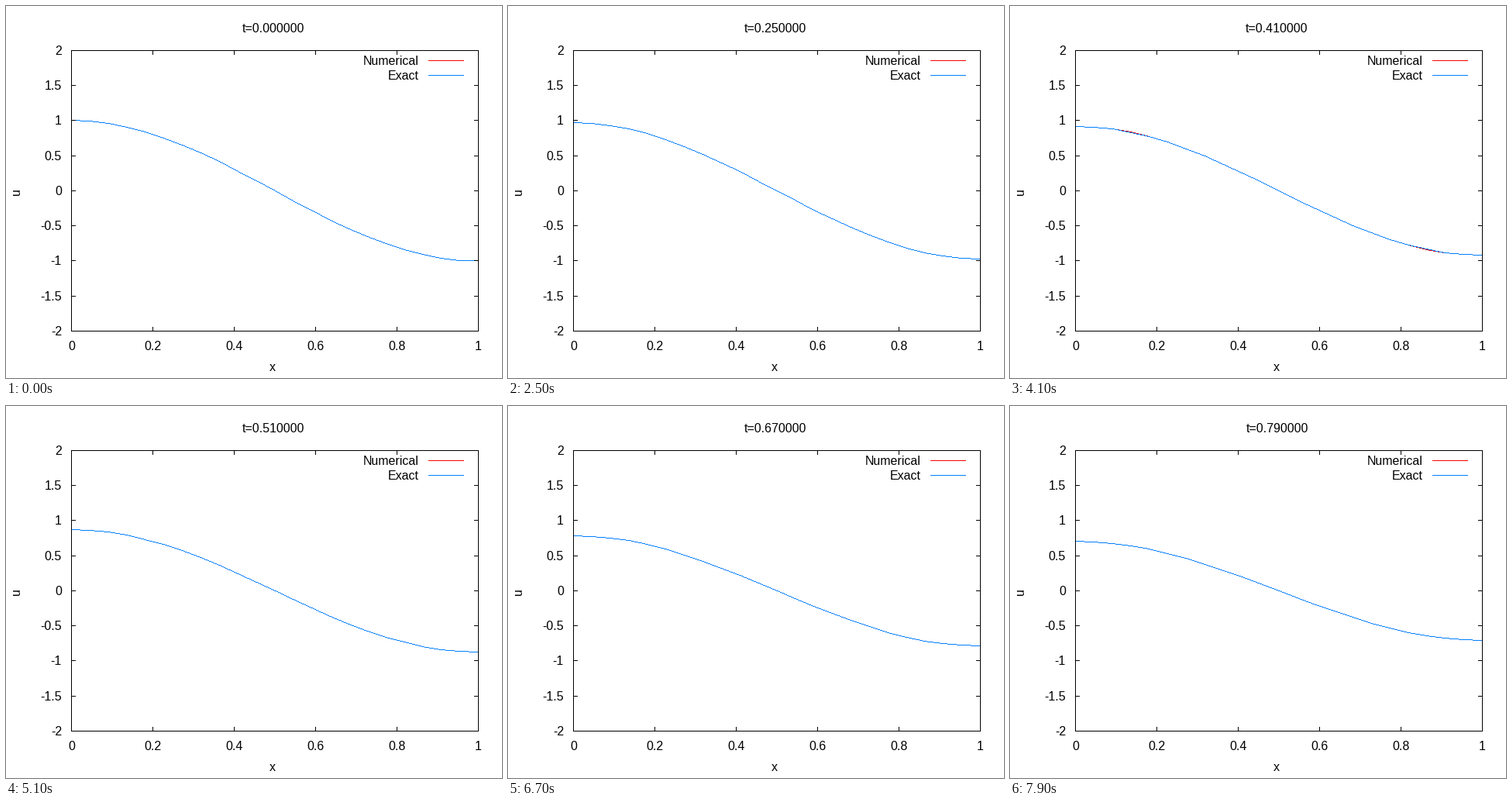
Write a matplotlib script that moves like this. It is 640 px wide and 480 px high and loops after 8000 ms.

```python
import numpy as np
import matplotlib.pyplot as plt
from matplotlib.animation import FuncAnimation
from matplotlib.collections import PolyCollection
from matplotlib.patches import Rectangle

W, H, DPI = 640, 480, 80
LEFT, RIGHT, TOP, BOTTOM = 84, 609, 57, 419
RED, BLUE = "#ff0000", "#0080ff"
FRAMES, INTERVAL, DT = 80, 100, 0.01
CELLS = 22

plt.rcParams["font.family"] = "Liberation Sans"
fig = plt.figure(figsize=(W / DPI, H / DPI), dpi=DPI, facecolor="white")
ax = fig.add_axes([0, 0, 1, 1])
ax.set_xlim(0, W)
ax.set_ylim(H, 0)
ax.axis("off")


def map_x(x):
    return np.floor(LEFT + np.asarray(x) * (RIGHT - LEFT) + 0.5).astype(int)


def map_y(u):
    up = (np.asarray(u) + 2) * (BOTTOM - TOP) / 4
    return BOTTOM - np.floor(up + 0.5).astype(int)


def bar(x0, y0, x1, y1, color="black", z=3):
    """Fill the pixels from (x0, y0) to (x1, y1), both included."""
    ax.add_patch(Rectangle((x0, y0), x1 - x0 + 1, y1 - y0 + 1, fc=color,
                           ec="none", lw=0, aa=False, zorder=z))


def label(x, y, text, ha="center", **kw):
    return ax.text(x, y, text, ha=ha, va="baseline",
                   fontsize=16 * 72 / DPI, color="black", **kw)


# Frame, ticks and tick labels
for y in (TOP, BOTTOM):
    bar(LEFT, y, RIGHT, y)
for x in (LEFT, RIGHT):
    bar(x, TOP, x, BOTTOM)
for v in np.arange(-2, 2.1, 0.5):
    y = int(map_y(v))
    bar(LEFT, y, LEFT + 5, y)
    bar(RIGHT - 5, y, RIGHT, y)
    label(72, y + 6, f"{v:g}", "right")
for v in np.arange(6) / 5:
    x = int(map_x(v))
    bar(x, TOP, x, TOP + 5)
    bar(x, BOTTOM - 5, x, BOTTOM)
    label(x + 0.5, 444, f"{v:g}")

label(344, 471, "x")
label(18, 239.5, "u", rotation=90, rotation_mode="anchor")
title = label(344.5, 34, "")

# Key
for y, name, color in ((70, "Numerical", RED), (89, "Exact", BLUE)):
    label(533, y + 6, name, "right")
    bar(545, y, 590, y, color)

# Standing wave cos(pi x) cos(t) and its leapfrog approximation
grid = np.linspace(0, 1, CELLS + 1)
mode = np.cos(np.pi * grid)
courant = DT * CELLS / np.pi
omega = 2 / DT * np.arcsin(courant * np.sin(np.pi / (2 * CELLS)))
SQUARE = np.array([[0, 0], [1, 0], [1, 1], [0, 1]])


def pixels(u):
    """Unit squares along an aliased polyline through the grid values."""
    px, py = map_x(grid), map_y(u)
    cols = np.arange(LEFT, RIGHT + 1)
    seg = np.clip(np.searchsorted(px, cols, side="right") - 1, 0, CELLS - 1)
    dx, dy = np.diff(px)[seg], np.diff(py)[seg]
    step = (2 * np.abs(dy) * (cols - px[seg]) + dx) // (2 * dx)
    rows = py[seg] + np.sign(dy) * step
    return np.column_stack([cols, rows])[:, None, :] + SQUARE


def curve(color, z):
    return ax.add_collection(PolyCollection(
        pixels(mode), facecolors=color, edgecolors="none", linewidths=0,
        antialiaseds=False, zorder=z), autolim=False)


numerical, exact = curve(RED, 1), curve(BLUE, 2)


def update(i):
    t = i * DT
    title.set_text(f"t={t:.6f}")
    numerical.set_verts(pixels(np.cos(omega * t) * mode))
    exact.set_verts(pixels(np.cos(t) * mode))
    return title, numerical, exact


anim = FuncAnimation(fig, update, frames=FRAMES, interval=INTERVAL,
                     repeat=True, repeat_delay=0, blit=False)
plt.show()
```
